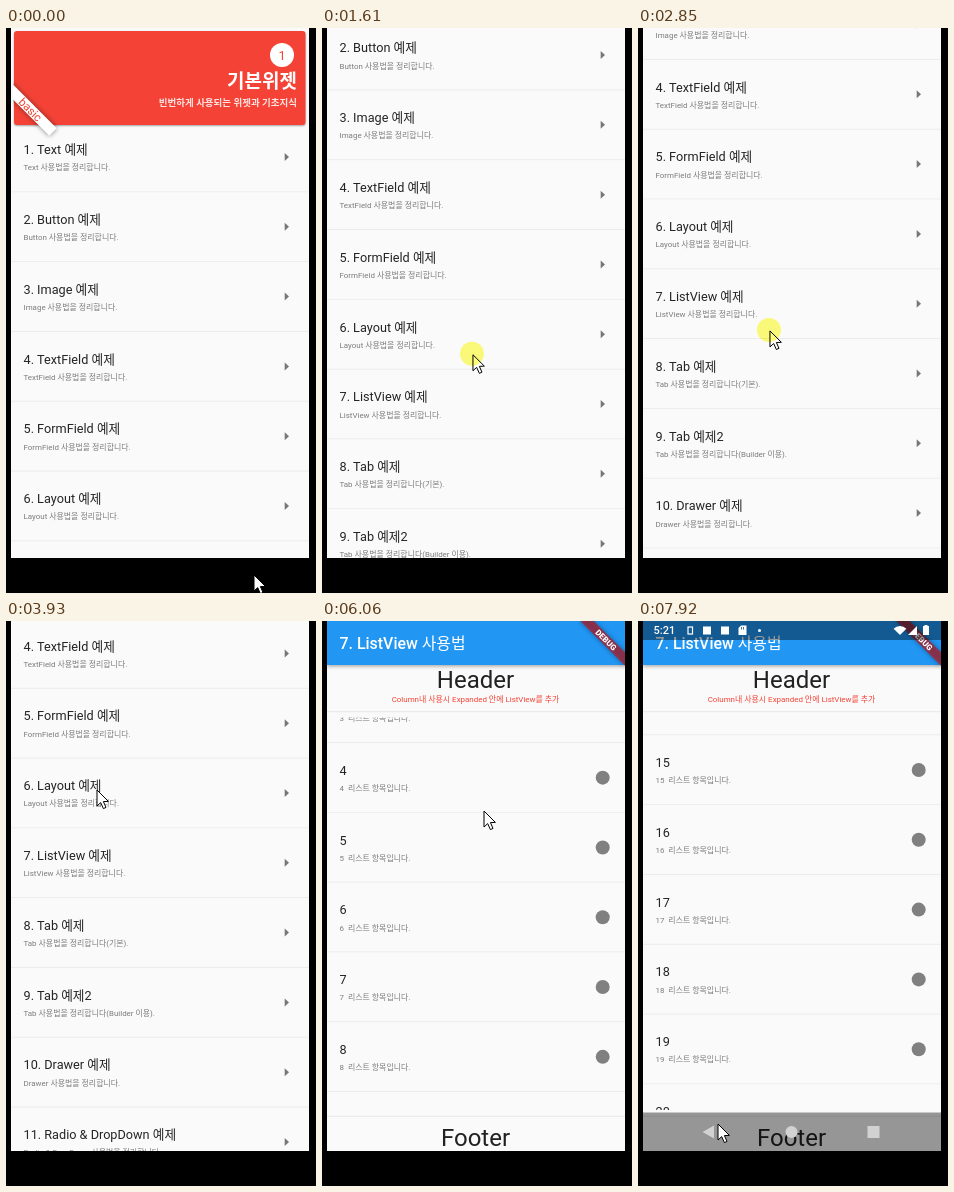
Write an HTML page with a canvas that moves like this. It is 310 px wide and 565 px high and loops after 7990 ms.

```html
<!DOCTYPE html>
<html lang="ko">
<head>
<meta charset="utf-8">
<style>
html, body { margin: 0; width: 100%; height: 100%; overflow: hidden; background: #000; }
canvas { display: block; width: 310px; height: 565px; }
</style>
</head>
<body>
<canvas id="stage"></canvas>
<script>
const W = 310, H = 565, LOOP = 7990, ROW = 69.8;
const L = 5, R = 303, B = 530;
const FONT = 'Roboto, "Noto Sans CJK KR", "Noto Sans KR", "Noto Sans CJK", sans-serif';
const canvas = document.getElementById('stage');
const ctx = canvas.getContext('2d');
const dpr = window.devicePixelRatio || 1;
canvas.width = W * dpr;
canvas.height = H * dpr;

const lessons = ['Text', 'Button', 'Image', 'TextField', 'FormField', 'Layout',
  'ListView', 'Tab', 'Tab', 'Drawer', 'Radio & DropDown'];
const titleTail = { 8: '2' };
const noteTail = { 7: '(기본)', 8: '(Builder 이용)' };

const linear = p => p;
const smooth = p => p * p * (3 - 2 * p);
const settle = p => 1 - (1 - p) ** 3;
const fling = p => 1 - (1 - p) ** 1.8;
const clamp01 = p => Math.max(0, Math.min(1, p));

// Each key: [time, value..., easing used to arrive there]
const menuScroll = [
  [370, 0, linear], [760, 76, smooth], [1140, 100, settle], [1270, 100, linear],
  [1610, 171.5, linear], [1760, 209, linear], [2510, 247, settle], [2710, 247, linear],
  [2850, 272, linear], [3200, 300, linear], [3490, 306, settle]
];
const listScroll = [[5750, 0, linear], [6060, 182.5, linear], [7410, 959, fling]];
const pointer = [
  [50, 248, 547, linear], [190, 180, 399, smooth], [370, 180, 399, linear],
  [760, 170, 323, smooth], [1140, 162, 392, smooth], [1270, 160, 399, linear],
  [1610, 151, 327, linear], [1760, 146, 290, linear], [2300, 140, 328, smooth],
  [2710, 140, 328, linear], [2850, 132, 303, linear], [3200, 118, 275, linear],
  [3490, 115, 269, settle], [3560, 115, 269, linear], [3930, 91, 169, smooth],
  [4130, 91, 169, linear], [4910, 74, 282, smooth], [5300, 74, 282, linear],
  [5750, 150, 373, smooth], [6040, 162, 190, linear], [6650, 162, 190, linear],
  [7100, 73, 532, smooth], [7160, 73, 532, linear], [7410, 76, 519, smooth],
  [7540, 76, 519, linear], [7900, 80, 503, smooth]
];
const presses = [[370, 760], [1270, 1760], [2710, 3490], [4940, 5060], [5750, 6030]];

function at(keys, t, i = 1) {
  if (t <= keys[0][0]) return keys[0][i];
  for (let k = 1; k < keys.length; k++) {
    const a = keys[k - 1], b = keys[k];
    if (t <= b[0]) {
      const ease = b[b.length - 1];
      return a[i] + (b[i] - a[i]) * ease((t - a[0]) / (b[0] - a[0]));
    }
  }
  return keys[keys.length - 1][i];
}

function box(x, y, w, h, color) {
  ctx.fillStyle = color;
  ctx.fillRect(x, y, w, h);
}

function disc(x, y, r, color) {
  ctx.fillStyle = color;
  ctx.beginPath();
  ctx.arc(x, y, r, 0, 7);
  ctx.fill();
}

function poly(points, color) {
  ctx.fillStyle = color;
  ctx.beginPath();
  points.forEach(([x, y]) => ctx.lineTo(x, y));
  ctx.closePath();
  ctx.fill();
}

// y is the middle of the capitals
function text(str, x, y, size, color, weight = 400, align = 'left') {
  ctx.font = `${weight} ${size}px ${FONT}`;
  ctx.textAlign = align;
  ctx.fillStyle = color;
  ctx.fillText(str, x, y + size * 0.36);
}

function clip(x, y, w, h) {
  ctx.beginPath();
  ctx.rect(x, y, w, h);
  ctx.clip();
}

function shadow(color, blur, dy = 0) {
  ctx.shadowColor = color;
  ctx.shadowBlur = blur * dpr;
  ctx.shadowOffsetY = dy * dpr;
}

function ribbon(label, x, y, height, size, back, color, weight) {
  ctx.save();
  ctx.translate(x, y);
  ctx.rotate(Math.PI / 4);
  ctx.save();
  shadow('rgba(0,0,0,.5)', 5);
  box(-31.8, -height / 2, 63.6, height, back);
  ctx.restore();
  text(label, 0, 0, size, color, weight, 'center');
  ctx.restore();
}

function row(y, title, note) {
  text(title, 17.5, y + 27.3, 12.7, '#242424');
  text(note, 17.5, y + 45.2, 7.95, '#7c7c7c');
  box(L, y + ROW - 0.8, R - L, 0.9, '#ebebeb');
}

function card(y) {
  ctx.save();
  shadow('rgba(0,0,0,.35)', 2, 1);
  ctx.fillStyle = '#f44336';
  ctx.beginPath();
  ctx.roundRect(8, y + 3, 291.5, 94, 3);
  ctx.fill();
  ctx.restore();
  disc(276, y + 27, 12, '#fff');
  text('1', 276, y + 27, 12.7, '#f44336', 400, 'center');
  text('기본위젯', 291, y + 53.5, 19, '#fff', 700, 'right');
  text('빈번하게 사용되는 위젯과 기초지식', 291, y + 75, 9.5, '#ffe3e0', 700, 'right');
  ctx.save();
  clip(7, y, 100, 120);
  ribbon('basic', 24.5, y + 81.5, 10.5, 11.5, '#fff', '#f44336', 400);
  ctx.restore();
}

function menuPage(t) {
  const s = at(menuScroll, t);
  box(L, 0, R - L, B, '#fafafa');
  lessons.forEach((name, i) => {
    const y = 94.4 + i * ROW - s;
    if (y < -ROW || y > B) return;
    row(y, `${i + 1}. ${name} 예제${titleTail[i] || ''}`,
      `${name} 사용법을 정리합니다${noteTail[i] || ''}.`);
    poly([[278.7, y + 30.6], [283, y + 34.6], [278.7, y + 38.6]], '#777');
  });
  if (s < 115) card(-s);
}

function listPage(t) {
  const s = at(listScroll, t), mid = 153.5;
  box(L, 0, R - L, B, '#fafafa');

  ctx.save();
  clip(L, 96.5, R - L, 392.5);
  const first = Math.floor(s / ROW);
  for (let i = first; i < first + 7; i++) {
    const y = 96 + i * ROW - s, n = i + 1;
    row(y, `${n}`, `${n}  리스트 항목입니다.`);
    disc(280.7, y + 34.8, 7, '#808080');
  }
  ctx.restore();

  text('Header', mid, 58, 24, '#212121', 400, 'center');
  text('Column내 사용시 Expanded 안에 ListView를 추가', mid, 78.3, 7.95, '#f44336', 400, 'center');
  box(L, 90.3, R - L, 0.9, '#e6e6e6');
  box(L, 494.8, R - L, 0.9, '#e6e6e6');
  text('Footer', mid, 516, 24, '#212121', 400, 'center');

  ctx.save();
  shadow('rgba(0,0,0,.4)', 4, 1);
  box(L, 0, R - L, 44, '#2196f3');
  ctx.restore();
  text('7. ListView 사용법', 17.5, 22.7, 15.9, '#fff', 500);
  ribbon('DEBUG', 284, 19, 9.5, 8.1, 'rgba(175,30,45,.74)', '#fff', 900);
}

function statusBar() {
  box(L, 0, R - L, 19, 'rgba(0,0,0,.4)');
  text('5:21', 15.5, 9.5, 11, '#fff', 500);
  ctx.strokeStyle = '#fff';
  ctx.lineWidth = 1.2;
  ctx.strokeRect(50, 6, 4.5, 7);
  box(65, 5.5, 8, 8, '#fff');
  box(83, 5.5, 8, 8, '#fff');
  poly([[103, 4.5], [108.5, 4.5], [108.5, 14], [100.5, 14], [100.5, 7]], '#fff');
  box(103, 6, 1, 2.5, '#3b78a8');
  box(105, 6, 1, 2.5, '#3b78a8');
  disc(121.5, 9.5, 1.5, '#fff');
  ctx.fillStyle = '#fff';
  ctx.beginPath();
  ctx.moveTo(262, 14);
  ctx.arc(262, 14, 9, -Math.PI * 0.75, -Math.PI * 0.25);
  ctx.fill();
  poly([[279, 5], [279, 14], [270, 14]], '#fff');
  box(285, 5, 6, 9, '#fff');
  box(286.5, 4, 3, 1, '#fff');
}

function navBar() {
  const color = '#d2d2d2';
  box(L, 491.5, R - L, B - 491.5, 'rgba(0,0,0,.4)');
  poly([[64.5, 511], [76, 504.5], [76, 517.5]], color);
  disc(153.5, 511, 6, color);
  box(229.5, 505, 12, 12, color);
}

function systemBars(p) {
  if (p <= 0) return;
  ctx.save();
  ctx.globalAlpha = p;
  ctx.translate(0, -19 * (1 - p));
  statusBar();
  ctx.restore();
  ctx.save();
  ctx.globalAlpha = p;
  ctx.translate(0, 39 * (1 - p));
  navBar();
  ctx.restore();
}

function cursor(t) {
  const x = at(pointer, t), y = at(pointer, t, 2);
  const shape = [[0, 0], [0, 16], [3.7, 12.6], [6.4, 18.6], [9, 17.4], [6.4, 11.6], [11.4, 11.4]];
  ctx.save();
  ctx.translate(x, y);
  ctx.lineJoin = 'round';
  poly(shape, '#fff');
  ctx.strokeStyle = '#000';
  ctx.lineWidth = 1;
  ctx.stroke();
  // The press highlight tints the pointer as well
  if (presses.some(([a, b]) => t >= a && t <= b)) {
    ctx.globalCompositeOperation = 'multiply';
    disc(-1, -1, 12, '#fffd7a');
  }
  ctx.restore();
}

function draw(t) {
  ctx.setTransform(dpr, 0, 0, dpr, 0, 0);
  box(0, 0, W, H, '#000');
  ctx.save();
  clip(L, 0, R - L, B);
  const open = clamp01((t - 5040) / 300);
  if (open < 1) menuPage(t);
  if (open > 0) {
    ctx.save();
    ctx.globalAlpha = open * open;
    ctx.translate(0, B * 0.25 * (1 - open) ** 3);
    clip(L, 0, R - L, B);
    listPage(t);
    ctx.restore();
  }
  systemBars(settle(clamp01((t - 7610) / 260)));
  ctx.restore();
  cursor(t);
}

const start = performance.now();
function tick() {
  draw((performance.now() - start) % LOOP);
  requestAnimationFrame(tick);
}
tick();
</script>
</body>
</html>
```
